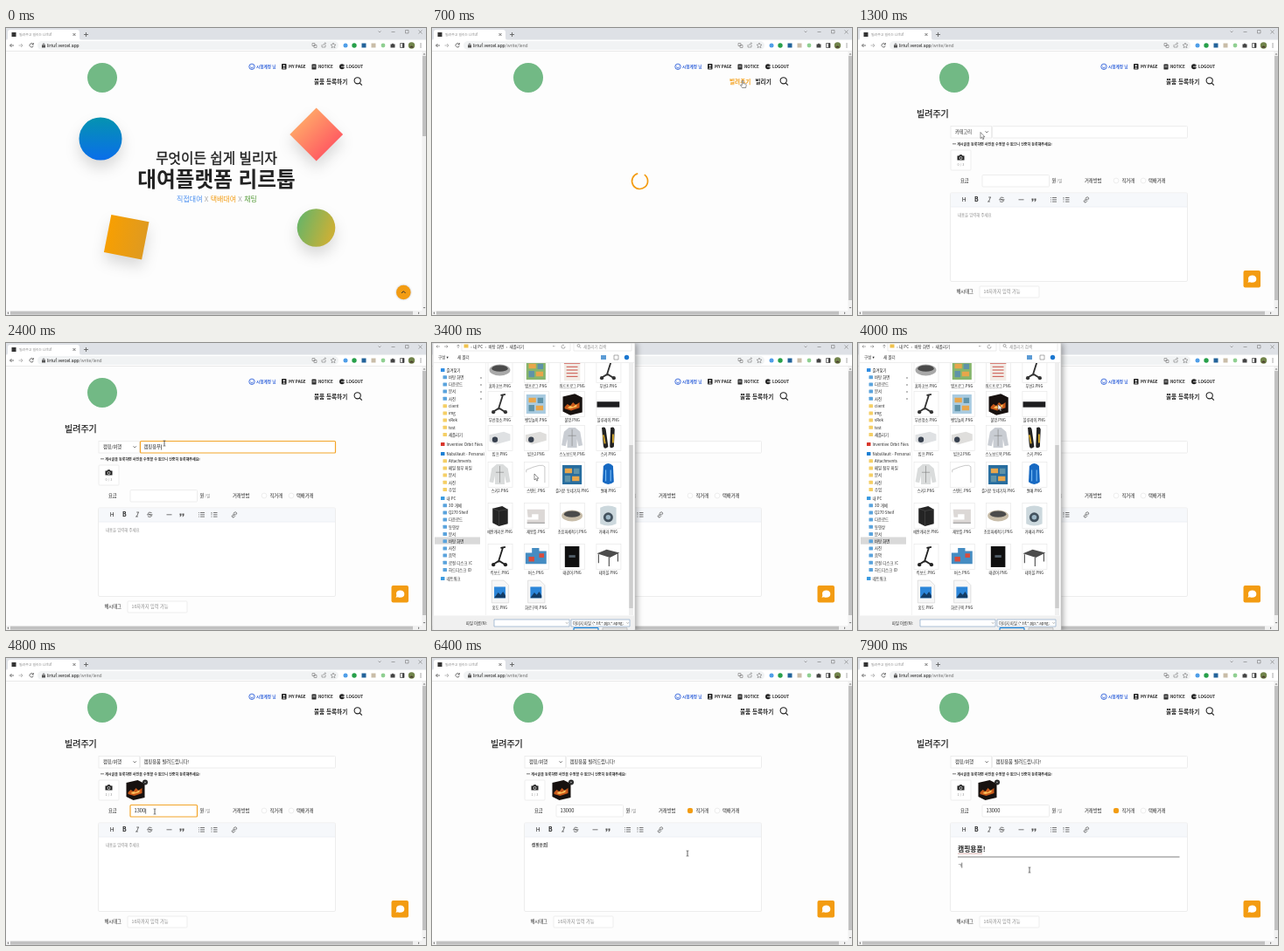
Write an HTML page that moves like this. It is 480 px wide and 329 px high and loops after 8000 ms.

```html
<!DOCTYPE html>
<html lang="ko">
<head>
<meta charset="utf-8">
<title>물품 등록</title>
<style>
html, body { margin: 0; width: 100%; height: 100%; overflow: hidden; background: #fdfdfd; }
svg { display: block; width: 100vw; height: 100vh; }
text { font-family: "Noto Sans CJK KR", "Noto Sans CJK", "Noto Sans", sans-serif; fill: #222; white-space: pre; }
.url { font: 5.3px Roboto, sans-serif; }
.b { font-weight: 700; }
.m { stroke: #222; stroke-width: .025em; }
.mid { text-anchor: middle; }
.grey { fill: #8b8b8b; }
.blue { fill: #2e60da; }
.orange { fill: #f39c12; }
.box { fill: #fff; stroke: #e9e9e9; stroke-width: .8; }
.box.focus { stroke: #f3a52a; stroke-width: 1.2; }
.line { fill: none; stroke: #555; stroke-width: .8; }
.thin { fill: none; stroke: #777; stroke-width: .6; }
.shade { filter: drop-shadow(0 9px 8px rgba(0, 0, 0, .14)); }
</style>
</head>
<body>
<svg viewBox="0 0 480 329" preserveAspectRatio="none">
<defs>
  <linearGradient id="blue" x2="0" y2="1"><stop stop-color="#0593b0"/><stop offset="1" stop-color="#0a6eea"/></linearGradient>
  <linearGradient id="coral"><stop stop-color="#ffa168"/><stop offset="1" stop-color="#ff5f62"/></linearGradient>
  <linearGradient id="amber"><stop stop-color="#f79f02"/><stop offset="1" stop-color="#df9a20"/></linearGradient>
  <linearGradient id="leaf" y2=".35"><stop stop-color="#5eb56c"/><stop offset="1" stop-color="#c8b038"/></linearGradient>
  <g id="fire">
    <path d="M-10-8L3-11 11-7V9L-2 12-10 8Z" fill="#17110f"/>
    <path d="M-8 3l3-3 3 2 3-4 3 3 4-3v6l-9 3-7-2Z" fill="#c9591a"/>
    <path d="M-5 4l3-2 3 1 4-3v3l-7 2Z" fill="#ffc05a"/>
  </g>
  <clipPath id="listClip"><rect x="63" y="23" width="162" height="289"/></clipPath>
</defs>

<!-- browser frame -->
<rect width="480" height="329" fill="#fdfdfd"/>
<rect width="480" height="14" fill="#dee1e6"/>
<path d="M0 14q2 0 2-3V5q0-3 3-3h76q3 0 3 3v6q0 3 3 3Z" fill="#fff"/>
<rect y="13.5" width="480" height="13" fill="#fff"/>
<path d="M0 26.5H480" stroke="#dcdcdc" stroke-width=".6"/>
<rect x="6.5" y="5" width="5" height="5" fill="#333"/>
<text class="grey" x="15" y="9.3" font-size="3.9">빌려주고 빌리는 Lirtuf</text>
<path class="line" d="M76.500 6l3 3m0-3l-3 3M89 7.500h5m-2.500-2.500v5"/>
<path class="thin" d="M425.500 3.500l1.500 1.500 1.500-1.500M440.500 4.500h4M456.500 2.500h3.500v3.500h-3.500zM471.500 2.500l4 4m0-4l-4 4"/>
<path class="line" d="M9 20H4.500m2-2l-2 2 2 2"/>
<path class="line" style="stroke:#aaa" d="M14.500 20h4.500m-2-2l2 2-2 2"/>
<path class="line" d="M31 18.500a2.200 2.200 0 1 0 .3 2M31.300 17v2h-2"/>
<rect x="36" y="15" width="344" height="10" rx="5" fill="#f1f3f4"/>
<path d="M41 19.500h4v3h-4z" fill="#555"/><path class="line" d="M42 19.500v-1q1-1.500 2 0v1"/>
<text class="url" x="47" y="21.800">lirtuf.vercel.app<tspan id="path" fill="#777"></tspan></text>
<path class="thin" d="M350 17.500h3v3h-3zM352 19.500h3v3h-3zM361 19v3h4v-3m-2.500 1q0-2.500 3-2.500m-1-1l1 1-1 1M374 17l.9 2 2.100.2-1.600 1.400.5 2.100-1.900-1.100-1.900 1.100.5-2.100-1.600-1.400 2.100-.2z"/>
<circle cx="388" cy="20" r="2.500" fill="#4f9ee8"/><circle cx="398" cy="20" r="2.700" fill="#27a04a"/>
<rect x="406.500" y="17.500" width="5" height="5" fill="#23639a"/><rect x="417.500" y="17.500" width="5" height="5" fill="#c9bda8"/>
<circle cx="431" cy="20" r="2.400" fill="#8fcf91"/>
<path d="M439.500 18.500h1.500q1-2 2 0h1.500v4h-5z" fill="#444"/>
<path class="line" d="M450.500 17.500h4.500v5h-4.500z"/><path d="M453 17.500h2v5h-2z" fill="#444"/>
<circle cx="463.500" cy="20" r="3.700" fill="#72844b"/><path d="M461 22.500q2.500-4 5 0z" fill="#493b2d"/>
<path d="M474 17.500v5" stroke="#555" stroke-dasharray="1 1"/>

<!-- site header -->
<circle cx="110" cy="57" r="17" fill="#72b985"/>
<g fill="none" stroke="#2e60da" stroke-width=".9"><circle cx="281" cy="44.300" r="3.200"/><path d="M279.400 45q1.600 2 3.200 0M279.800 43.200v.5m2.400-.5v.5"/></g>
<text class="b blue" x="286" y="46" font-size="4.600">시험계정 님</text>
<rect x="315" y="41" width="5.500" height="6.500" rx=".8" fill="#222"/><circle cx="317.700" cy="43.300" r="1.100" fill="#fff"/><path d="M316 46.500q1.700-2.500 3.400 0z" fill="#fff"/>
<text class="b" x="323" y="46" font-size="4.600">MY PAGE</text>
<rect x="349.500" y="41.500" width="5" height="6" rx=".6" fill="#222"/><path d="M350.500 43.500h3m-3 1.500h3" stroke="#fff" stroke-width=".6"/>
<text class="b" x="357" y="46" font-size="4.500">NOTICE</text>
<circle cx="384" cy="44.300" r="3" fill="#222"/><path d="M383 44.300h4m-1.300-1.300l1.300 1.300-1.300 1.300" stroke="#fff" stroke-width=".7" fill="none"/>
<text class="b" x="389" y="46" font-size="4.600">LOGOUT</text>
<text class="b" id="menu" x="352" y="64" font-size="6.600">물품 등록하기</text>
<g id="submenu" class="b" font-size="6.600"><text class="orange" x="340" y="64">빌려주기</text><text x="369.500" y="64">빌리기</text></g>
<path d="M404.300 63.200l2.500 2.500" stroke="#222" stroke-width="1.200"/><circle cx="401.700" cy="60.300" r="3.600" fill="none" stroke="#222" stroke-width="1.100"/>

<!-- landing page -->
<g id="home">
  <circle class="shade" cx="108" cy="127" r="24.500" fill="url(#blue)"/>
  <g class="shade"><rect x="-21.500" y="-21.500" width="43" height="43" fill="url(#coral)" transform="translate(354.700 122) rotate(45)"/></g>
  <g class="shade"><rect x="-22" y="-22" width="44" height="44" fill="url(#amber)" transform="translate(137.700 239.700) rotate(11)"/></g>
  <circle class="shade" cx="354.500" cy="229" r="21.800" fill="url(#leaf)"/>
  <text class="m mid" x="240.500" y="154.500" font-size="15.700">무엇이든 쉽게 빌리자</text>
  <text class="b mid" x="240.500" y="182" font-size="23.600">대여플랫폼 리르툽</text>
  <text class="mid" x="241" y="199" font-size="8"><tspan fill="#4a8ff0">직접대여</tspan><tspan fill="#aaa"> X </tspan><tspan fill="#f39c12">택배대여</tspan><tspan fill="#aaa"> X </tspan><tspan fill="#5a9e3e">채팅</tspan></text>
  <circle cx="454.300" cy="303" r="8.300" fill="#f39c12" style="filter:drop-shadow(0 .5px .8px #0004)"/>
  <path d="M452 304l2.300-2.300 2.300 2.300" fill="none" stroke="#333" stroke-width="1"/>
</g>

<path id="spinner" d="M5.200-7.400A9 9 0 1 1-2.300-8.700" fill="none" stroke="#f39c12" stroke-width="1.700"/>

<!-- lending form -->
<g id="form">
  <text class="m" x="67" y="102" font-size="10">빌려주기</text>
  <rect class="box" x="106" y="112.500" width="46.500" height="13.500"/>
  <text id="category" x="111" y="121" font-size="5.200"></text>
  <path class="line" d="M145.500 118.300l1.700 1.700 1.700-1.700"/>
  <rect class="box" id="titleBox" x="153.500" y="112.500" width="223" height="13.500" rx="1"/>
  <text id="title" x="157.500" y="121.200" font-size="5.300"></text>
  <text class="b" x="108" y="135.300" font-size="4">** 게시글을 등록하면 사진을 수정할 수 없으니 신중히 등록해주세요!</text>
  <rect class="box" x="106" y="140" width="23" height="23" rx="1"/>
  <path d="M113.500 146.500h2l.8-1.200h2.400l.8 1.200h2v5h-8z" fill="#222"/><circle cx="117.500" cy="149" r="1.500" fill="none" stroke="#fff" stroke-width=".7"/>
  <text class="mid grey" id="count" x="117.500" y="157.500" font-size="3.800"></text>
  <g id="thumb"><use href="#fire" x="147.500" y="151"/><circle cx="159" cy="142.500" r="3" fill="#222"/><path d="M158 141.500l2 2m0-2l-2 2" stroke="#fff" stroke-width=".5"/></g>
  <g font-size="5.300">
    <text x="117" y="177">요금</text><text x="221.500" y="177">원<tspan font-size="4.300" fill="#777"> /일</tspan></text>
    <text x="259" y="177">거래방법</text><text x="301.500" y="177">직거래</text><text x="332" y="177">택배거래</text>
    <text x="112.500" y="304.300">해시태그</text>
  </g>
  <rect class="box" id="priceBox" x="142" y="168.500" width="76.500" height="13.500" rx="1"/>
  <text id="price" x="146.500" y="177.300" font-size="5.700"></text>
  <circle cx="295" cy="175" r="2.900" class="box"/><circle cx="326" cy="175" r="2.900" class="box"/>
  <rect id="radio" x="292" y="172" width="6" height="6" rx="2" fill="#f39c12"/>
  <rect class="box" x="105.500" y="189" width="271" height="101.500" rx="1.500"/>
  <path d="M106 189.500h270v15.500h-270z" fill="#f6f8fb"/><path d="M106 205h270" stroke="#e9ecf2" stroke-width=".8"/>
  <g font-size="6.800"><text class="mid" x="121.200" y="199.200">H</text><text class="mid b" x="135.300" y="199.200">B</text></g>
  <path class="line" d="M149.200 194h2.800m-4 5h2.800m.6-5l-2 5M166.500 194.600q-4-1.500-4 .7 0 1.200 3 1.700 2 1 0 2.200-2 .5-3.500-.5M161 196.800h6.500M183.500 196.800h6M222 194.500h5m-5 2.300h5m-5 2.300h5M237 194.500h4.500m-4.500 2.300h4.500m-4.500 2.300h4.500M220 194.500h.8m-.8 2.300h.8m-.8 2.300h.8M235 194v1.500m-.5 1.300h1m-1 2.300h1M259.800 198.300l2.200-2.600m-2.300-.2l1.500-1.300q1.500-.8 2.300.4.500 1-.6 2l-.9.900m-1.400-1.400l-2 1.600q-1 1.200.2 2 1 .7 2-.2l1.200-1.200"/>
  <path d="M198.500 195.500h2v2l-1.300 1.700h-.7l.7-1.700h-.7zm3 0h2v2l-1.300 1.700h-.7l.7-1.700h-.7z" fill="#555"/>
  <text class="grey" id="hint" x="114" y="215.800" font-size="4.350">내용을 입력해 주세요</text>
  <rect id="mark" x="114" y="210.500" width="19" height="7" fill="#b5d3fb"/>
  <text class="m" id="body" x="114" y="215.800" font-size="4.600"></text>
  <g id="heading"><text class="b" x="114" y="222.300" font-size="7.800">캠핑용품!</text>
    <path d="M114 224.300h28" stroke="#b0605c" stroke-width=".5"/><path d="M114 227.600h253.500m0 1h-253.500" stroke="#8c8c8c" stroke-width=".6"/></g>
  <text id="next" x="114" y="239.300" font-size="4.600"></text>
  <g id="levels"><rect class="box" x="114" y="205.500" width="58" height="78"/></g>
  <rect class="box" x="139" y="296" width="68" height="13" rx="1"/>
  <text class="grey" x="143.500" y="304.400" font-size="5.200">10자까지 입력 가능</text>
  <rect x="440.500" y="278" width="19.500" height="19.500" rx="2" fill="#f39c12"/>
  <path d="M445.500 291.800l.8-2.300q-1.500-5.500 4-6 5 .2 5 4.200 0 4-5 4-1.500 0-2.300-.5z" fill="#fff"/>
  <g id="options"></g>
  <path id="caret" stroke="#222" stroke-width=".6"/>
</g>

<!-- scrollbars -->
<path d="M475.500 27h4.500v302h-480v-5h475.500z" fill="#f1f1f1"/>
<rect id="scroll" x="476" y="32" width="4" fill="#c1c1c1"/><rect x="5" y="324.700" width="460" height="4" fill="#c1c1c1"/>
<path d="M476.500 30.500l1.500-1.500 1.500 1.500zm0 289.500l1.500 1.500 1.500-1.500zM3 325.200l-1.500 1.500 1.500 1.500zm468 0l1.500 1.500-1.500 1.500z" fill="#777"/>

<!-- file picker -->
<g id="dialog">
  <rect x="1" width="231" height="329" fill="#fff" stroke="#c4c4c4" stroke-width=".7" style="filter:drop-shadow(2px 1px 3px #0005)"/>
  <path class="thin" d="M9 4H5m1.500-1.500l-1.500 1.500 1.500 1.500M14 4h4m-1.500-1.500l1.500 1.500-1.500 1.500M30 6V2m-1.500 1.500l1.500-1.500 1.500 1.500M138 3l1.200 1.200 1.200-1.200M151 2.500a2 2 0 1 0 1 1.500M169 3a1.500 1.500 0 1 1-3 0 1.500 1.500 0 0 1 3 0m-.3 1.300l1.500 1.700"/>
  <path d="M34-1h124v10h-124zM162-1h66v10h-66z" fill="none" stroke="#ddd" stroke-width=".6"/>
  <rect x="36.500" y="1.500" width="5" height="4" fill="#f0c24c"/>
  <g font-size="4.500"><text x="43" y="5.800"> › 내 PC  ›  바탕 화면  ›  새폴리기</text><text class="grey" x="173" y="5.800">새폴리기 검색</text>
    <text x="7" y="18">구성 ▾</text><text x="29" y="18">새 폴더</text></g>
  <path d="M1.500 22.500h230" stroke="#e6e6e6" stroke-width=".7"/>
  <path d="M193 14h6v5h-6z" fill="#5b9bd5"/><path class="thin" d="M208 14h5v5h-5z"/><circle cx="222.500" cy="16.500" r="2.700" fill="#1d78d0"/>
  <rect x="3" y="222.500" width="52" height="8.200" fill="#d9d9d9"/>
  <g id="tree" font-size="4.400"></g>
  <path d="M61.500 23v289" stroke="#eee" stroke-width=".7"/>
  <g id="files" clip-path="url(#listClip)"></g>
  <rect x="225" y="23" width="5" height="289" fill="#f0f0f0"/><rect x="225.300" y="117" width="4.400" height="187" fill="#cdcdcd"/>
  <path d="M1.500 312.500h230v16.500h-230z" fill="#f0f0f0"/>
  <path d="M71 317h86v8h-86zM159 317h67v8h-67z" fill="#fff" stroke="#8aa8c8" stroke-width=".7"/>
  <path d="M162 326.500h28v4h-28z" fill="#e1e1e1" stroke="#0078d7"/><path d="M195 326.500h28v4h-28z" fill="#e1e1e1" stroke="#adadad" stroke-width=".6"/>
  <path class="thin" d="M153 320.300l1.200 1.200 1.200-1.200M222.500 320.300l1.200 1.200 1.200-1.200"/>
  <g font-size="4.300"><text x="39" y="322.800">파일 이름(N):</text><text id="picked" x="73" y="322.700"></text><text x="161" y="322.700">이미지 파일 (*.tif;*.pjp;*.apng;</text></g>
</g>

<g id="cursor">
  <path id="arrow" d="M0 0v7l1.600-1.400 1.100 2.500 1.200-.5-1.100-2.400h2.100z" fill="#fff" stroke="#222" stroke-width=".5"/>
  <path id="hand" d="M-.7-3.500q.7-1 1.400 0v3l2.800.7q.8.300.7 1.300l-.6 3h-4l-2.200-3q.2-1.200 1.900.2z" fill="#fff" stroke="#222" stroke-width=".5"/>
  <path id="beam" d="M-1.300-3q1 0 1.300.5.300-.5 1.300-.5M0-2.500v5M-1.300 3q1 0 1.300-.5.300.5 1.300.5" fill="none" stroke="#222" stroke-width=".7"/>
</g>
</svg>

<script>
const LOOP = 8000, SYL = 0xAC00, KEY_MS = 45;
const $ = id => document.getElementById(id);
const show = (id, on) => { $(id).style.display = on ? '' : 'none'; };
const within = (t, a, b) => t >= a && t < b;

// every state of a Korean text while it is being typed
function strokes(text) {
  const lead = 'ㄱㄲㄴㄷㄸㄹㅁㅂㅃㅅㅆㅇㅈㅉㅊㅋㅌㅍㅎ';
  const out = [''];
  let done = '';
  for (const ch of text) {
    const c = ch.charCodeAt(0) - SYL;
    if (c >= 0 && c < 11172) {
      out.push(done + lead[c / 588 | 0], done + String.fromCharCode(SYL + c - c % 28));
      if (c % 28) out.push(done + ch);
    } else out.push(done + ch);
    done += ch;
  }
  return out;
}
const typed = (list, t, start, step = KEY_MS) =>
  list[Math.max(0, Math.min(list.length - 1, Math.floor((t - start) / step)))];

const titleKeys = strokes('캠핑용품 빌려드립니다!');
const bodyKeys = strokes('캠핑용품!');
const priceKeys = strokes('13000');

// folder tree: y, icon colour, label, children, child icon colour
const SKY = '#5aa3dd', SAND = '#f5cf66';
const tree = [
  [31, '#2f8de4', '즐겨찾기', '바탕 화면,다운로드,문서,사진', SKY],
  [64, '', '', 'client,img,vRek,test,새폴리기', SAND],
  [116, '#d8352a', 'Inventive Orbit Files', '', ''],
  [127, '#1b7fd4', 'NubaVault - Personal', 'Attachments,메일 첨부 파일,문서,사진,수업', SAND],
  [178, '#3a9ae0', '내 PC', '3D 개체,Q270 Shelf,다운로드,동영상,문서,바탕 화면,사진,음악,로컬 디스크 (C,하드디스크 (D', SKY],
  [270, '#3a9ae0', '네트워크', '', '']
];
const node = (x, y, color, label) => label &&
  `<rect x="${x}" y="${y - 2}" width="4.500" height="4" rx=".5" fill="${color}"/><text x="${x + 6.5}" y="${y + 1.7}">${label}</text>`;
$('tree').innerHTML = tree.map(([y, color, label, kids, kidColor]) =>
  node(10, y, color, label) +
  kids.split(',').map((k, i) => node(12.5, y + 8.2 * (i + 1), kidColor, k)).join('')).join('') +
  '<path d="M56 39v26" stroke="#aaa" stroke-width="1.500" stroke-dasharray="2 6"/>';

// flat pictures for the thumbnails, centred on 0,0
const line = (d, c, w = 1.5) => `<path d="${d}" fill="none" stroke="${c}" stroke-width="${w}"/>`;
const fill = (d, c) => `<path d="${d}" fill="${c}"/>`;
const pics = {
  scooter: c => line('M4-12L-2 7M1-11l6-1M-9 10l8-5 8 5', c, 2) + `<circle cx="-8" cy="10" r="2.300" fill="${c}"/><circle cx="7" cy="10" r="2.300" fill="${c}"/>`,
  book: c => fill('M-12-12h24v24h-24z', c) + fill('M-9-8h9v6h-9zM0 2h9v6h-9z', '#e8a64b') + fill('M2-8h7v7h-7zM-9 1h7v8h-7z', '#5f93a8'),
  list: c => fill('M-10-13h20v26h-20z', '#f2ece6') + fill('M-10-13h20v5h-20z', c) + line('M-7-4h14m-14 4h14m-14 4h14m-14 4h14', c, 1),
  box: c => fill('M-9-9L3-12 10-8V10L-1 13-9 9Z', c) + line('M-9-9l8 3v19M-1-6l11-2', '#555', .6),
  fire: () => '<use href="#fire" transform="scale(1.150)"/>',
  slab: c => fill('M-14-3h28v7h-28z', c),
  tall: c => fill('M-9-13h18v26h-18z', c) + fill('M-4-2h8v3h-8z', '#53606b'),
  projector: c => fill('M-13-4l18-4 8 3v8l-18 5-8-4z', c) + '<circle cx="-6" cy="2" r="3.500" fill="#38414f"/>',
  jacket: c => fill('M-4-13h8l6 5 3 17-5 1-2-9v11h-12v-11l-2 9-5-1 3-17z', c) + line('M0-11v21M-5-3h10', '#777', .6),
  boards: c => fill('M-8-13q4-2 5 2l3 22q-5 4-6-1zM3-13q4-2 5 2l-1 22q-5 3-5-1z', c) + line('M-6-4l2 11M6-5v11', '#d4a72c', 2),
  lamp: c => line('M-12-6q20-9 23-4v20M-12-6v3', c, .7),
  sled: c => fill('M-6-11q6-6 12 0l1 20q-7 6-14 0z', c) + line('M-3-6v14M3-6v14', '#8fd0ff', 1),
  sewing: c => fill('M-11-8h22v17h-22v-4h14v-7h-8v4h-5z', c) + line('M-11 9h22', '#888', 1),
  oval: c => `<ellipse rx="13" ry="7" fill="${c}"/><ellipse cy="-2" rx="10" ry="4" fill="#4b4b4b"/>`,
  camera: c => fill('M-10-10q10-5 20 0v20q-10 5-20 0z', c) + '<circle cy="2" r="6" fill="#43525e"/><circle cy="2" r="3" fill="#9cb6c5"/>',
  toys: c => fill('M-13-5h8v-6h9v4h9v16h-26z', c) + fill('M-9 0h7v6h-7zM4-4h6v5h-6z', '#d84b3c'),
  table: c => fill('M-14-4l12-5 16 4-12 6z', c) + line('M-12-3v11M1 1v11M12-4v10', c, 1.2),
  page: () => fill('M-10-14h15l6 6v22h-21z', '#f7f7f7') + line('M-10-14h15l6 6v22h-21z', '#ccc', .6) + fill('M-7-6h14v14h-14z', '#2c86d9') + fill('M-7 8l5-7 3 3 3-4 3 5v3z', '#123c66')
};
const files = `홈아코브 oval #a9a9a9,탭프로그 book #86b56c,워드프로그 list #c8443a,무선2 scooter #333
무선청소 scooter #333,뱅잉놀이 book #a9cbe0,불멍 fire -,블루레이 slab #1d1d1f
빔프 projector #dfe1e3,빔프2 projector #dfdedc,스노보드복 jacket #c9cdd3,스키 boards #222
스키2 jacket #dadcdc,스탠드 lamp #aaa,즐거운_동네기차 book #276d9f,썰매 sled #1769c2
애완캐리온 box #242424,재봉틀 sewing #dcd8d6,초음파세척기 oval #c8bda9,카메라 camera #ccd8dd
킥보드 scooter #222,버스 toys #458cc2,태권어 tall #101010,테이블 table #4c4c4c
홍도 page -,화로구이 page -`;
const labelY = [50, 89, 128, 170, 217, 264, 304];
$('files').innerHTML = files.split('\n').map((row, r) => row.split(',').map((f, c) => {
  const [name, pic, color] = f.split(' '), x = 77.5 + 41.3 * c, y = labelY[r] - 19;
  const card = pic === 'page' ? '' : '<rect x="-13.500" y="-14.500" width="28" height="29" fill="#fff" stroke="#e8e8e8" stroke-width=".7"/>';
  const glow = pic === 'fire' ? '<rect id="chosen" x="-19" y="-17" width="38" height="39" fill="#cce8ff"/>' : '';
  return `<g transform="translate(${x} ${y})">${glow}${card}<g transform="scale(.92)">${pics[pic](color)}</g><text class="mid" y="20" font-size="4.200">${name.replace('_', ' ')}.PNG</text></g>`;
}).join('')).join('');

// category list
const kinds = '카테고리,가전/디지털,가구/소품,유아용품,생활/주방,캠핑/여행,스포츠,취미/게임,의류/잡화,도서/음반,반려동물,식물,기타'.split(',');
$('options').innerHTML = '<rect x="106" y="126.500" width="47" height="90" fill="#fff" stroke="#888" stroke-width=".6"/>' +
  '<rect x="106" y="161" width="47" height="6.900" fill="#1967d2"/>' +
  kinds.map((k, i) => `<text x="109" y="${131.7 + 6.9 * i}" font-size="5" style="fill:${i === 5 ? '#fff' : '#222'}">${k}</text>`).join('');

// heading sizes
let rowY = 206;
[9, 8, 7, 6.3, 5.6, 5].forEach((size, i) => {
  rowY += size + 4;
  $('levels').innerHTML += `<text class="b" x="118" y="${rowY - 3}" font-size="${size}">Heading ${i + 1}</text>`;
});
$('levels').innerHTML += '<text x="118" y="279" font-size="4.600">Paragraph</text>';

// pointer stops: time, x, y, look from then on
const stops = [
  [150, 420, 110, 'arrow'], [300, 371, 62, 'hand'], [500, 355, 64, 'hand'], [950, 355, 64, 'arrow'],
  [1250, 140, 119, 'arrow'], [1400, 140, 121, 'arrow'], [1650, 125, 164, 'arrow'], [1850, 181, 115, 'beam'],
  [3050, 181, 115, 'arrow'], [3250, 117, 150, 'hand'], [3400, 117, 150, 'arrow'], [3600, 137, 136, 'arrow'],
  [3750, 137, 136, 'arrow'], [4000, 160, 70, 'arrow'], [4200, 160, 70, 'arrow'], [4420, 170, 176, 'beam'],
  [4950, 170, 176, 'arrow'], [5200, 295, 175, 'hand'], [5350, 295, 175, 'arrow'], [5600, 292, 224, 'beam'],
  [6480, 292, 224, 'beam'], [6680, 120, 214, 'beam'], [6850, 121, 197, 'hand'], [6950, 121, 197, 'arrow'],
  [7100, 130, 214, 'hand'], [7200, 130, 214, 'beam'], [7450, 196, 243, 'beam'], [8000, 196, 243, 'beam']
];
function movePointer(t) {
  const i = stops.findLastIndex(s => s[0] <= t);
  show('cursor', i >= 0);
  if (i < 0) return;
  const [t0, x0, y0, look] = stops[i], [t1, x1, y1] = stops[i + 1] || [LOOP, x0, y0];
  const k = (t - t0) / (t1 - t0), e = k * k * (3 - 2 * k);
  $('cursor').setAttribute('transform', `translate(${x0 + (x1 - x0) * e} ${y0 + (y1 - y0) * e})`);
  for (const name of ['arrow', 'hand', 'beam']) show(name, name === look);
}

function placeCaret(t) {
  const id = within(t, 1860, 3250) ? 'title' : within(t, 4450, 5200) ? 'price'
    : within(t, 5600, 6700) ? 'body' : t >= 7500 ? 'next' : '';
  show('caret', id);
  if (!id) return;
  const el = $(id), x = +el.getAttribute('x') + (el.textContent ? el.getComputedTextLength() : 0) + .5;
  $('caret').setAttribute('d', `M${x} ${el.getAttribute('y') - 4.7}v6`);
}

function draw() {
  const t = performance.now() % LOOP;
  const picking = within(t, 3350, 4250), hover = within(t, 250, 1050);
  show('home', t < 550);
  show('spinner', within(t, 550, 850));
  $('spinner').setAttribute('transform', `translate(237.5 175.5) rotate(${(t - 700) * .36})`);
  show('form', t >= 850);
  show('menu', !hover);
  show('submenu', hover);
  $('path').textContent = t < 550 ? '' : '/write/lend';
  $('scroll').setAttribute('height', t < 550 ? 92 : 280);

  show('options', within(t, 1350, 1700));
  $('category').textContent = t < 1700 ? '카테고리' : '캠핑/여행';
  $('title').textContent = typed(titleKeys, t, 1900);
  $('price').textContent = typed(priceKeys, t, 4480, 80);
  $('titleBox').classList.toggle('focus', within(t, 1860, 3250));
  $('priceBox').classList.toggle('focus', within(t, 4450, 5200));
  $('count').textContent = t < 4300 ? '0 / 3' : '1 / 3';
  show('thumb', t >= 4300);
  show('radio', t >= 5200);

  show('dialog', picking);
  show('chosen', t >= 4050);
  $('picked').textContent = t >= 4050 ? '불멍.PNG' : '';

  $('body').textContent = t < 7150 ? typed(bodyKeys, t, 5850) : '';
  show('hint', t < 5895);
  show('mark', within(t, 6700, 7150));
  show('levels', within(t, 6900, 7150));
  show('heading', t >= 7150);
  $('next').textContent = t >= 7800 ? 'ㄱ' : '';
  placeCaret(t);
  movePointer(t);
  requestAnimationFrame(draw);
}
draw();
</script>
</body>
</html>
```
